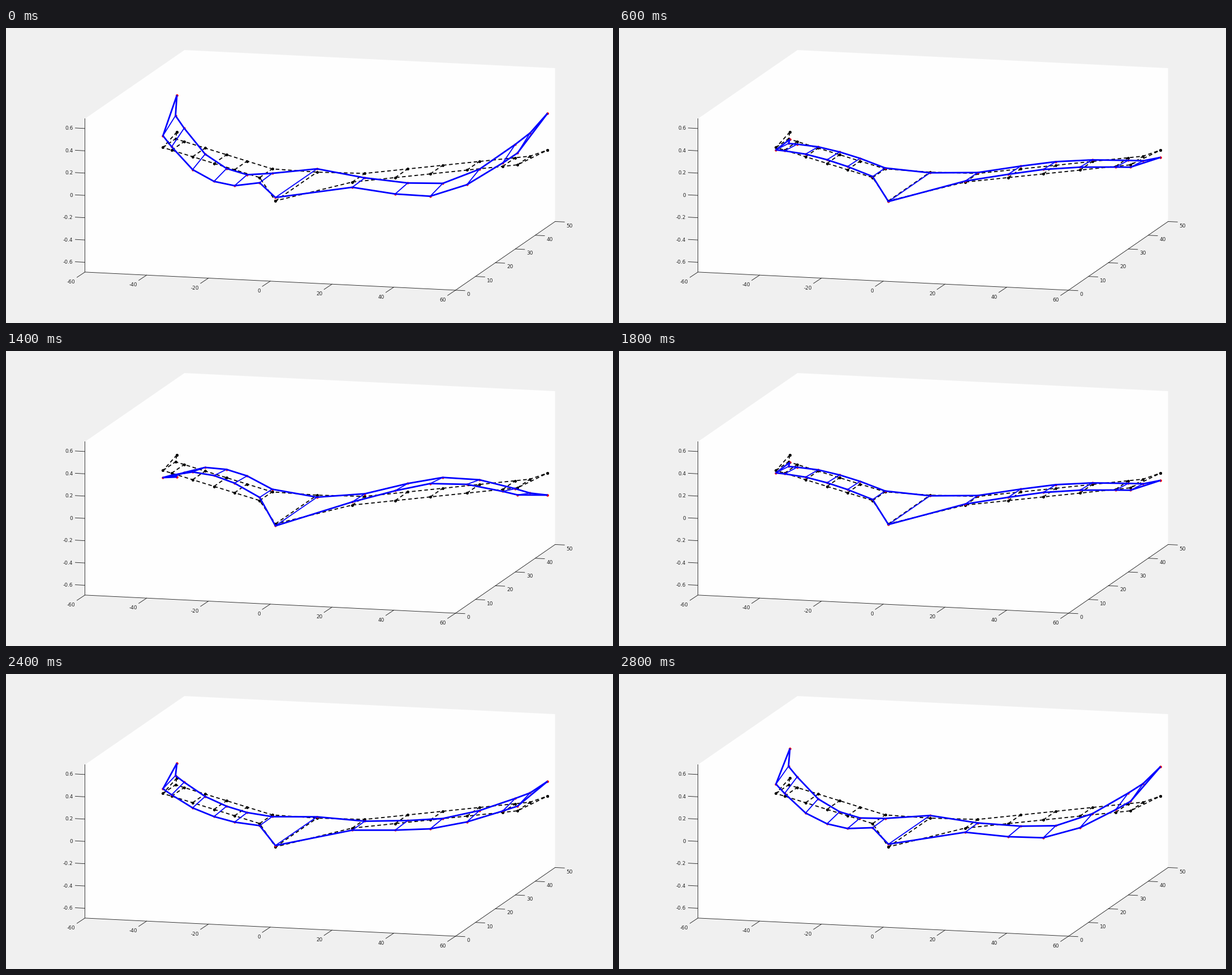
Animation, 1073 px wide and 522 px high, one loop 3 s. Source, as a matplotlib script:

```python
import numpy as np
import matplotlib.pyplot as plt
from matplotlib.animation import FuncAnimation
from matplotlib.patches import Polygon

W, H, DPI = 1073, 522, 64
PX = 72 / DPI
FRAMES, STEP_MS = 15, 200
INK = "#262626"

# Oblique projection: screen position of the origin and one unit of each axis
ORIGIN = np.array([467.1, 312.2])
AXES = np.array([[5.46, 0.267], [3.52, -2.43], [0, -197.25]])
SPAN, DEPTH, ZMAX = 60, 50, 0.688

CHORD = 6.3
STATIONS = np.array([15, 26, 35, 44.4, 53.6, 57.4])


def project(x, y, z):
    pts = np.stack(np.broadcast_arrays(x, y, z), axis=-1)
    return (ORIGIN + pts @ AXES).T


def rear_y(x):
    """Trailing edge of the swept wing."""
    return 18.15 + 0.406 * np.abs(x)


def mode(x, y):
    """Bending plus twist, with a slight left-right imbalance."""
    s = np.abs(x) / SPAN
    u = s ** 2
    bending = 0.03 - 1.39 * u + 2.65 * u ** 2 - 1.137 * u ** 3
    twist = 0.0177 * u * (y - rear_y(x) + CHORD)
    skew = -0.021 * np.sign(x) * np.exp(-((s - 0.62) / 0.12) ** 2)
    return bending + twist + skew


def amplitude(frame):
    """Quick swing down, then a slow return."""
    return 1 - 0.4 * frame if frame <= 5 else -1 + 0.2 * (frame - 5)


# Both edges run from tip to tip and share their end points
xs = np.concatenate([[-SPAN], -STATIONS[::-1], [0], STATIONS, [SPAN]])
root, tip = xs == 0, np.abs(xs) == SPAN
rear = np.select([root, tip], [23.5, 46.2], rear_y(xs))
front = np.select([root, tip], [2.6, 46.2], rear_y(xs) - CHORD)


def edge(y, a):
    return project(xs, y, a * mode(xs, y))


def rungs(a):
    """All cross bars as one path, separated by gaps."""
    bars = np.stack([edge(front, a), edge(rear, a),
                     np.full((2, len(xs)), np.nan)], axis=-1)
    return bars[:, 1:-1].reshape(2, -1)


def nodes(a):
    return np.hstack([edge(rear, a), edge(front, a)])


fig = plt.figure(figsize=(W / DPI, H / DPI), dpi=DPI, facecolor="#f0f0f0")
ax = fig.add_axes([0, 0, 1, 1])
ax.set_xlim(0, W)
ax.set_ylim(H, 0)
ax.axis("off")


def line(pts, color, width, z, **kw):
    return ax.plot(*pts, color=color, lw=width * PX, zorder=z, snap=False, **kw)[0]


def dots(pts, color, size, z):
    return ax.plot(*pts, "o", color=color, ms=size * PX, mew=0,
                   zorder=z, snap=False)[0]


def tick(start, step, value, gap, ha):
    end = start + step
    line(np.array([start, end]).T, INK, 0.9, 2)
    x, y = end + gap
    ax.text(x, y + 3.3, f"{value:g}", color=INK, ha=ha, va="baseline",
            fontsize=9 * PX, family="DejaVu Sans")


def draw_box():
    wall = project([-SPAN, -SPAN, SPAN, SPAN, SPAN, -SPAN],
                   [0, DEPTH, DEPTH, DEPTH, 0, 0],
                   [ZMAX, ZMAX, ZMAX, -ZMAX, -ZMAX, -ZMAX])
    ax.add_patch(Polygon(wall.T, fc="#fefefe", ec="none", zorder=1))
    line(project([-SPAN, -SPAN, SPAN, SPAN], [0, 0, 0, DEPTH],
                 [ZMAX, -ZMAX, -ZMAX, -ZMAX]), INK, 0.9, 2)
    for i in range(-3, 4):
        tick(project(-SPAN, 0, i / 5), (-17, -0.9), i / 5, (-4, 0.2), "right")
        tick(project(20 * i, 0, -ZMAX), (-14, 9.3), 20 * i, (-3, 7.6), "right")
    for y in range(0, DEPTH + 1, 10):
        tick(project(SPAN, y, -ZMAX), (16.5, 0.8), y, (3.5, 6), "left")


draw_box()

# Shape at rest
dash = dict(linestyle=(0, (3.6, 2.5)), dash_capstyle="butt")
for pts in (edge(rear, 0), edge(front, 0), rungs(0)):
    line(pts, "black", 1.8, 3, **dash)
dots(nodes(0), "black", 5, 4)

# Moving shape
joints = dots(nodes(0), "red", 4.2, 5)
rear_line, front_line = [
    line(edge(y, 0), "blue", 2.8, 6, solid_capstyle="butt",
         solid_joinstyle="round") for y in (rear, front)]
bars = line(rungs(0), "blue", 1.8, 6, solid_capstyle="butt")


def update(frame):
    a = amplitude(frame)
    rear_line.set_data(*edge(rear, a))
    front_line.set_data(*edge(front, a))
    bars.set_data(*rungs(a))
    joints.set_data(*nodes(a))
    return rear_line, front_line, bars, joints


anim = FuncAnimation(fig, update, frames=FRAMES, interval=STEP_MS,
                     repeat=True, repeat_delay=0, blit=False)
plt.show()
```
